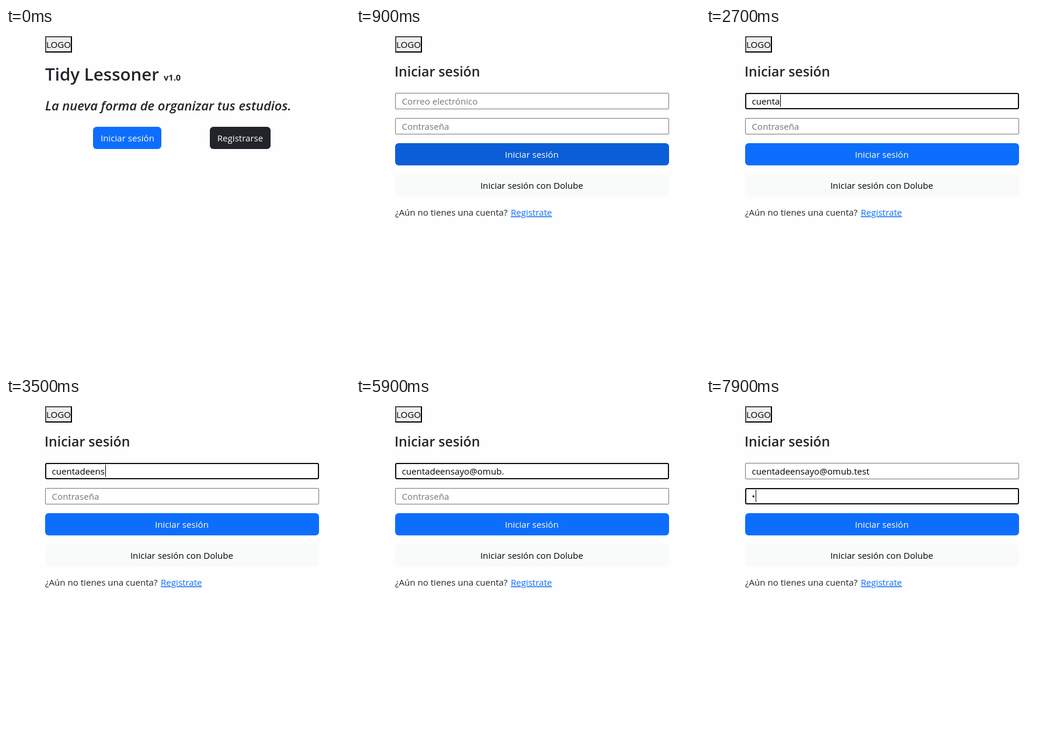
Recreate the animation shown at these times as an HTML page. Size 589 px wide and 585 px high, loop 8000 ms.

```html
<!DOCTYPE html>
<html lang="es">
<head>
<meta charset="utf-8">
<title>Iniciar sesión</title>
<style>
  html, body { margin: 0; width: 100%; height: 100%; overflow: hidden; background: #fefefe; }
  svg { display: block; width: 589px; height: 585px; font: 15.1px "Open Sans", "Noto Sans", sans-serif; fill: #212529; }
  .semi { font-weight: 600; }
  .mid { text-anchor: middle; }
  .white { fill: #fff; }
  .black { fill: #000; }
  .field { fill: #fff; }
  .link { fill: #0d6efd; text-decoration: underline; }
</style>
</head>
<body>
<svg viewBox="0 0 589 585">
  <rect x="67" y="14" width="46" height="28" fill="#000"/>
  <path d="M67 42V14H113L111 16H69V40Z" fill="#4c4c4c"/>
  <rect x="69" y="16" width="42" height="24" fill="#efefef"/>
  <text class="mid black" x="90" y="34">LOGO</text>

  <g id="home">
    <text class="semi" x="67" y="90" font-size="29.5">Tidy Lessoner</text>
    <text x="270" y="90" font-size="14.6" font-weight="700">v1.0</text>
    <text class="semi" x="67" y="141" font-size="22" font-style="italic">La nueva forma de organizar tus estudios.</text>
    <rect id="enter" x="149" y="169" width="117" height="38" rx="6"/>
    <text class="mid white" x="208" y="194">Iniciar sesión</text>
    <rect x="349" y="169" width="104" height="38" rx="6"/>
    <text class="mid white" x="401" y="194">Registrarse</text>
  </g>

  <g id="login">
    <text class="semi" x="66" y="83" font-size="23.1">Iniciar sesión</text>
    <rect class="field" id="mailBox"/>
    <text id="mail" x="78.5" y="131"></text>
    <rect class="field" id="passBox"/>
    <text id="pass" x="78.5" y="174"></text>
    <rect class="black" id="caret" width="1" height="21"/>
    <rect id="send" x="67" y="197" width="469" height="38" rx="6"/>
    <text class="mid white" x="301" y="222">Iniciar sesión</text>
    <rect x="67" y="250" width="469" height="38" rx="6" fill="#f9fbfb"/>
    <text class="mid black" x="301" y="275">Iniciar sesión con Dolube</text>
    <text x="67" y="321">¿Aún no tienes una cuenta?</text>
    <text class="link" x="265" y="321">Registrate</text>
  </g>
</svg>
<script>
const LOOP = 8000, STEP = 100;
const ADDRESS = "cuentadeensayo@omub.test";
const KEYS = [1700, 1900, 2000, 2200, 2400, 2700, 2800, 3000, 3300, 3400, 3500, 3700,
  3800, 3900, 4500, 4900, 5000, 5200, 5300, 5400, 6000, 6100, 6200, 6300];
const OPEN = 800, FOCUS_MAIL = 1300, HOVER_PASS = 7000, FOCUS_PASS = 7300, KEY_PASS = 7900;

const $ = id => document.getElementById(id);
const set = (id, attrs) => {
  for (const name in attrs) $(id).setAttribute(name, attrs[name]);
};
const show = (id, on) => set(id, { visibility: on ? "visible" : "hidden" });

// Button blue: 0 is resting, 1 is hovered
function blue(hover) {
  const mix = (a, b) => Math.round(a + (b - a) * hover);
  return `rgb(${mix(13, 11)},${mix(110, 94)},${mix(253, 215)})`;
}

function field(id, top, focused, hovered) {
  const line = focused ? 2 : 1;
  set(id, {
    x: 67 + line / 2, y: top + line / 2, width: 469 - line, height: 28 - line,
    rx: focused ? 2 : 1.5, "stroke-width": line,
    stroke: focused ? "#101010" : hovered ? "#4f4f4f" : "#767676"
  });
}

function write(id, value, hint) {
  $(id).textContent = value || hint;
  set(id, { fill: value ? "#000" : "#757575" });
}

function placeCaret(t, typed) {
  const inPass = t >= FOCUS_PASS;
  const id = inPass ? "pass" : "mail";
  const value = inPass ? t >= KEY_PASS : typed > 0;
  const since = inPass ? (value ? KEY_PASS : FOCUS_PASS - STEP)
    : typed ? KEYS[typed - 1] : FOCUS_MAIL;
  const on = t >= FOCUS_MAIL && (t - since) % 1000 < 500;
  const width = value ? $(id).getComputedTextLength() : 0;
  set("caret", { x: Math.round(79 + width), y: inPass ? 157 : 114, opacity: on ? 1 : 0 });
}

function draw() {
  const t = Math.floor(performance.now() % LOOP / STEP) * STEP;
  show("home", t < OPEN);
  show("login", t >= OPEN);
  set("enter", { fill: blue(t < 400 ? 0 : t < 500 ? 0.5 : 1) });
  set("send", { fill: blue(t < 900 ? 0.5 : t < 1000 ? 1 : t < 1100 ? 0.5 : 0) });

  const typed = KEYS.filter(k => k <= t).length;
  field("mailBox", 111, t >= FOCUS_MAIL && t < FOCUS_PASS);
  field("passBox", 154, t >= FOCUS_PASS, t >= HOVER_PASS);
  write("mail", ADDRESS.slice(0, typed), "Correo electrónico");
  write("pass", t >= KEY_PASS ? "•" : "", "Contraseña");
  placeCaret(t, typed);
  requestAnimationFrame(draw);
}
draw();
</script>
</body>
</html>
```
